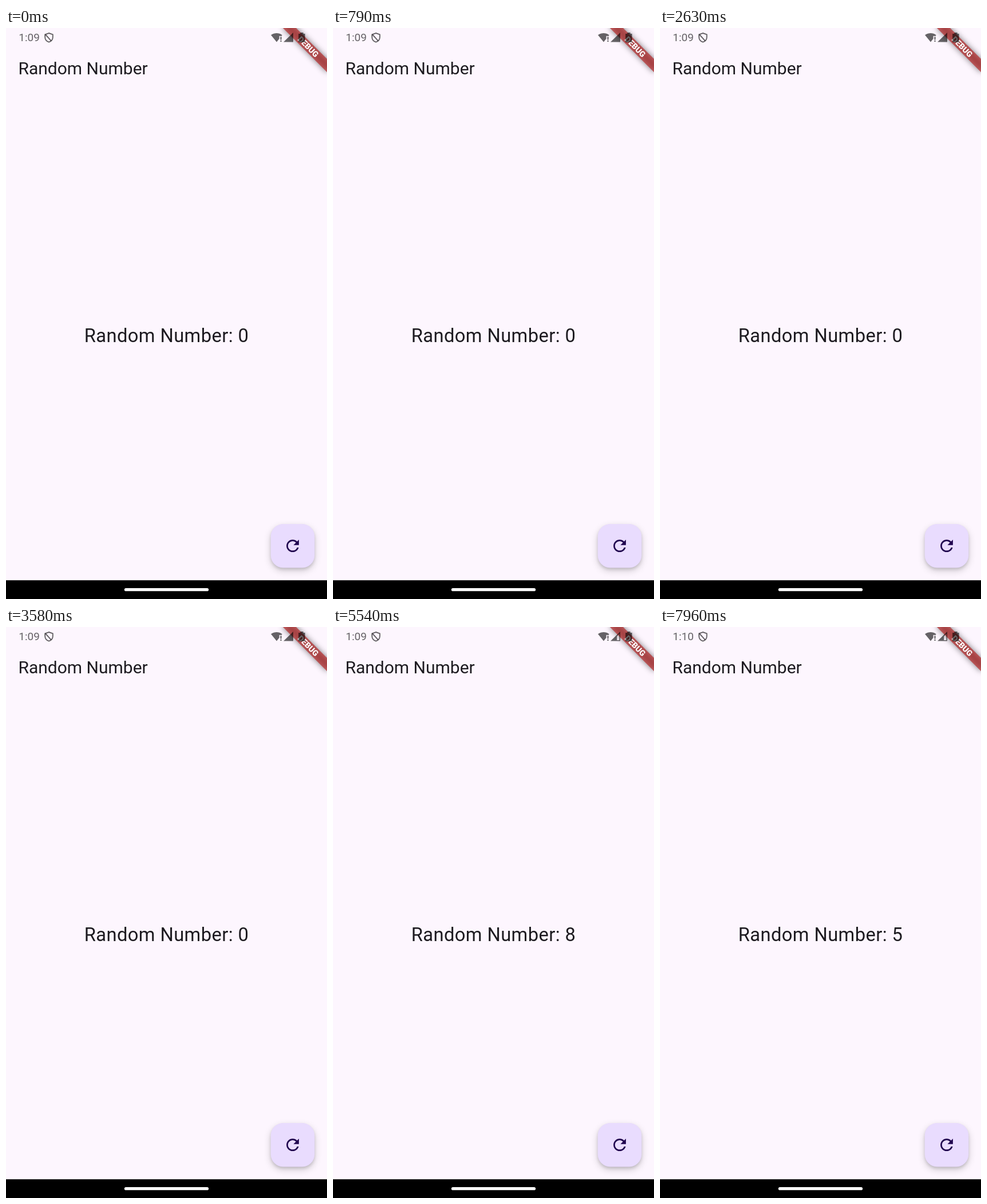
Write an HTML page with a canvas that moves like this. It is 561 px wide and 998 px high and loops after 8000 ms.

```html
<!DOCTYPE html>
<html lang="en">
<head>
<meta charset="utf-8">
<title>Random Number</title>
<style>
  html, body { margin: 0; width: 100%; height: 100%; overflow: hidden; background: #fdf6fe; }
  canvas { display: block; width: 561px; height: 998px; }
</style>
</head>
<body>
<canvas id="stage" width="561" height="998"></canvas>
<script>
const W = 561, H = 998, LOOP = 8000;
const DP = W / 411.4;
const INK = '#1d1b20', SYSTEM = 'rgba(0,0,0,0.6)';
const FONT = 'Roboto, sans-serif';

// Each tap sets a new number when it is released.
const TAPS = [[4560, 8], [5900, 3], [7200, 5]];
const SIGNAL_DROP = 3600, MINUTE_TURN = 7300;

const ctx = document.getElementById('stage').getContext('2d');

const SHIELD = new Path2D('M75 9L81.8 11.4V16C81.8 20.2 79 23.3 75 24.6C71 23.3 68.2 20.2 68.2 16V11.4Z');
const SLASH = new Path2D('M69 11.5L78.8 22.3');
const WIFI = new Path2D('M463 12.3C463.4 12 467.3 8.9 473 8.9S482.2 12 482.8 12.3L481.6 14H477.6V18.8L473 24.6Z' +
  'M479.4 15.2H481.6V20.4H479.4ZM479.4 21.8H481.6V24H479.4Z');
const SIGNAL = new Path2D('M485 24.5H502V8Z');
const WEAK_SIGNAL = new Path2D('M485 24.5H502V8ZM496.2 23H500.5V12L496.2 16.2Z');
const BATTERY = new Path2D('M514.4 8H519.6V10H522.6V25H511.2V10H514.4Z');
const REFRESH = new Path2D('M17.65 6.35A7.958 7.958 0 0 0 12 4c-4.42 0-7.99 3.58-7.99 8s3.57 8 7.99 8' +
  'c3.73 0 6.84-2.55 7.73-6h-2.08A5.99 5.99 0 0 1 12 18c-3.31 0-6-2.69-6-6s2.69-6 6-6' +
  'c1.66 0 3.14.69 4.22 1.78L13 11h7V4l-2.35 2.35z');

const clamp = v => Math.max(0, Math.min(1, v));

function text(str, x, y, font, color, align = 'left', spacing = 0) {
  ctx.font = font + ' ' + FONT;
  ctx.letterSpacing = spacing + 'px';
  ctx.textAlign = align;
  ctx.textBaseline = 'alphabetic';
  ctx.fillStyle = color;
  ctx.fillText(str, x, y);
}

function fillBox(x, y, w, h, r, color) {
  ctx.fillStyle = color;
  ctx.beginPath();
  ctx.roundRect(x, y, w, h, r);
  ctx.fill();
}

function drawBanner() {
  const reach = 40 * DP, h = 12 * DP;
  ctx.save();
  ctx.translate(W, 0);
  ctx.rotate(Math.PI / 4);
  ctx.filter = 'blur(5.4px)';
  fillBox(-reach, reach - h, reach * 2, h, 0, 'rgba(0,0,0,0.5)');
  ctx.filter = 'none';
  fillBox(-reach, reach - h, reach * 2, h, 0, 'rgba(183,28,28,0.627)');
  text('DEBUG', 0, reach - h / 2 + 4.8, '900 13.9px', '#fff', 'center');
  ctx.restore();
}

function drawStatus(t) {
  text(t < MINUTE_TURN ? '1:09' : '1:10', 22.2, 23, '19px', SYSTEM);
  ctx.strokeStyle = SYSTEM;
  ctx.lineWidth = 1.9;
  ctx.stroke(SHIELD);
  ctx.stroke(SLASH);
  ctx.fillStyle = SYSTEM;
  ctx.fill(WIFI);
  ctx.fill(t < SIGNAL_DROP ? SIGNAL : WEAK_SIGNAL, 'evenodd');
  ctx.fill(BATTERY);
}

function drawRipple(age, cx, cy) {
  if (age < 0 || age > 620) return;
  const grow = 1 - (1 - clamp(age / 400)) ** 2;
  const alpha = 0.045 * clamp(age / 90) * clamp((620 - age) / 260);
  ctx.fillStyle = `rgba(33,0,93,${alpha})`;
  ctx.beginPath();
  ctx.arc(cx, cy, 12 + 46 * grow, 0, Math.PI * 2);
  ctx.fill();
}

function drawButton(t) {
  const size = 56 * DP, x = W - 16 * DP - size, y = 867, r = 16 * DP;
  const cx = x + size / 2, cy = y + size / 2;
  ctx.save();
  for (const [blur, drop, alpha] of [[13, 5, 0.18], [5, 3, 0.12]]) {
    ctx.shadowColor = `rgba(0,0,0,${alpha})`;
    ctx.shadowBlur = blur;
    ctx.shadowOffsetY = drop;
    fillBox(x, y, size, size, r, '#e9dcfe');
  }
  ctx.restore();

  ctx.save();
  ctx.beginPath();
  ctx.roundRect(x, y, size, size, r);
  ctx.clip();
  for (const [at] of TAPS) drawRipple(t - at + 110, cx, cy);
  ctx.translate(cx - 12 * DP, cy - 12 * DP);
  ctx.scale(DP, DP);
  ctx.fillStyle = '#21064f';
  ctx.fill(REFRESH);
  ctx.restore();
}

function draw(t) {
  ctx.fillStyle = '#fdf6fe';
  ctx.fillRect(0, 0, W, H);
  const number = TAPS.reduce((n, [at, next]) => t >= at ? next : n, 0);
  text('Random Number', 21.4, 80.5, '30px', INK);
  text('Random Number: ' + number, W / 2, 548.7, '32.73px', INK, 'center', 0.4);
  drawButton(t);
  drawBanner();
  drawStatus(t);
  const navTop = H - 24 * DP;
  fillBox(0, navTop, W, H - navTop, 0, '#000');
  fillBox(W / 2 - 54 * DP, H - 14 * DP, 108 * DP, 4 * DP, 2 * DP, '#fff');
}

const start = performance.now();
function frame() {
  draw((performance.now() - start) % LOOP);
  requestAnimationFrame(frame);
}
frame();
</script>
</body>
</html>
```
